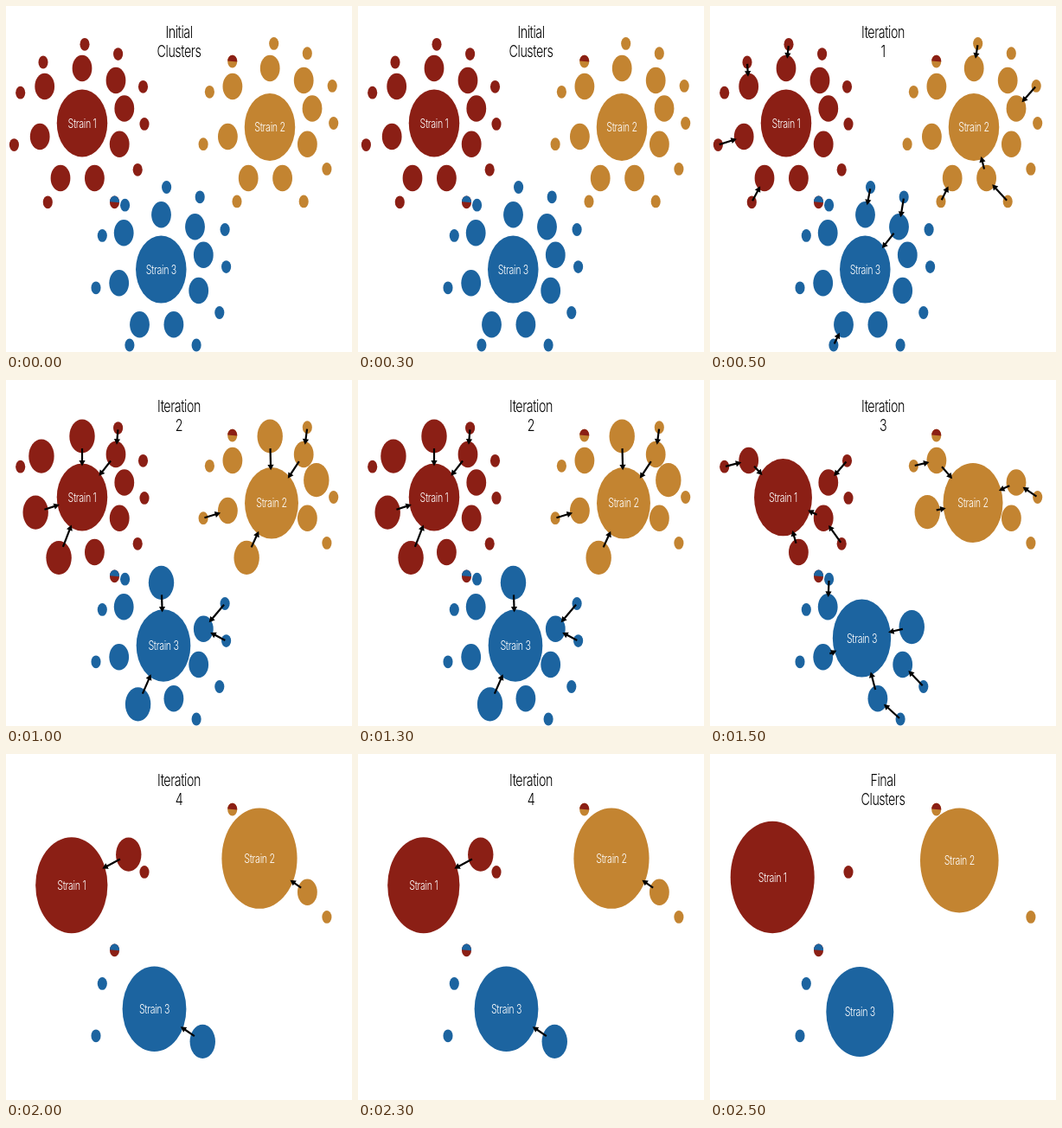
An HTML page that plays this animation: 400 px wide and 400 px high, repeating every 3 s.

```html
<!DOCTYPE html>
<html lang="en">
<head>
<meta charset="utf-8">
<title>Cluster iterations</title>
<style>
html, body { margin: 0; width: 100%; height: 100%; overflow: hidden; background: #fff; }
svg { display: block; width: 100vw; height: 100vh; }
text { font-family: Inter, "Liberation Sans", sans-serif; font-weight: 300; letter-spacing: -0.03em; text-anchor: middle; }
</style>
</head>
<body>
<svg id="stage" viewBox="0 0 400 400"></svg>
<script>
const STEP_MS = 500;
const SQUASH = 0.75; // the whole diagram lies on a narrowed plane
const RED = '#8b1f15', GOLD = '#c38431', BLUE = '#1c64a0';
const RADIUS = { s: 7.4, m: 15.2 };
const GROWN = 19.6, PUSH = 7;
const TITLES = ['Initial Clusters', 'Iteration 1', 'Iteration 2', 'Iteration 3', 'Iteration 4', 'Final Clusters'];

// Satellites of the first strain: m = inner ring, s = outer ring. Other strains shift them.
const SLOTS = {
  m: [[88, 72], [127, 86], [136.8, 118.5], [131.2, 159.7], [102.4, 199], [63, 199], [39.2, 151], [44.7, 93]],
  s: [[91, 44.3], [129.6, 55.6], [158.5, 93.3], [160, 136.4], [152.2, 189.3],
    [125.5, 226.8], [48.3, 226.8], [9.4, 160.6], [16.7, 100.2], [43, 65]]
};

// cores: x, y, radius after each round. merges: who joins whom in each round (c = core).
const STRAINS = [
  {
    color: RED, shift: { m: [0, 0], s: [0, 0] }, shared: { id: 's5', top: BLUE },
    cores: [[88, 135.5, 39], [88, 135.5, 39], [84.5, 135.7, 44.6], [75.8, 151.7, 55.5], [72.2, 142.5, 64.7]],
    merges: ['s0>m0 s9>m7 s7>m6 s6>m5', 'm0>c s1>m1 m1>c m6>c m5>c', 's8>m7 m7>c s2>m2 m3>c m4>c s4>m3', 'm2>c']
  },
  {
    color: GOLD, shift: { m: [217.2, 0], s: [218.7, -0.9] }, shared: { id: 's9', top: RED },
    cores: [[305, 140, 39], [307, 142.3, 41.3], [304, 142, 46], [293, 120.7, 58.1], [288.3, 123, 60.4]],
    merges: ['s0>m0 s2>m2 s6>m5 s5>m4 m4>c', 'm0>c s1>m1 m1>c s7>m6 m5>c', 's8>m7 m7>c m2>c s3>m2 m6>c', 'm3>c']
  },
  {
    color: BLUE, shift: { m: [91.5, 169.3], s: [94.6, 165.2] },
    cores: [[179.3, 304.6, 39], [182, 307, 41.8], [175.5, 298.5, 44.9], [171.5, 294.8, 49.2], [173.3, 298, 52]],
    merges: ['s0>m0 s1>m1 m1>c s6>m5', 'm0>c s2>m2 s3>m2 m5>c', 's9>m7 m7 m6>c m2>c m4>c s4>m3 s5>m4', 'm3>c']
  }
];

const ellipse = ({ x, y, r }, fill) =>
  `<ellipse cx="${x}" cy="${y}" rx="${r * SQUASH}" ry="${r}" fill="${fill}"/>`;

const label = (x, y, size, fill, str) =>
  `<text transform="translate(${x} ${y}) scale(${SQUASH} 1)" font-size="${size}" fill="${fill}">${str}</text>`;

const parse = (round = '') => round.split(' ').filter(Boolean).map(move => move.split('>'));

function twoTone(node, top, bottom) {
  const { x, y, r } = node, w = r * SQUASH;
  return ellipse(node, bottom) +
    `<path transform="translate(${x} ${y})" d="M${-w} -.5A${w} ${r} 0 0 1 ${w} .5z" fill="${top}"/>`;
}

// Point at a fraction of node a's radius, on the way to node b.
function towards(a, b, fraction) {
  const dx = b.x - a.x, dy = b.y - a.y;
  const t = fraction * a.r / Math.hypot(dx / SQUASH, dy);
  return [a.x + dx * t, a.y + dy * t];
}

function arrow(from, to, fromSmall, toCore) {
  const [x1, y1] = towards(from, to, fromSmall ? 0.25 : 0.72);
  const [x2, y2] = towards(to, from, toCore ? 0.92 : 0.75);
  const len = Math.hypot(x2 - x1, y2 - y1);
  const angle = Math.atan2(y2 - y1, x2 - x1) * 180 / Math.PI;
  return `<g transform="translate(${x1} ${y1}) rotate(${angle})">` +
    `<path d="M0 0H${len - 5}" stroke="#000" stroke-width="2.2"/>` +
    `<path d="M${len} 0l-6.5 -3.6v7.2z"/></g>`;
}

// A satellite that has just absorbed others is larger and pushed away from the core.
function satellite(strain, id, grown) {
  const ring = id[0];
  const [sx, sy] = SLOTS[ring][id[1]];
  const [dx, dy] = strain.shift[ring];
  const x = sx + dx, y = sy + dy;
  if (!grown) return { x, y, r: RADIUS[ring] };
  const [cx, cy] = strain.cores[0];
  const angle = Math.atan2(y - cy, x - cx);
  return { x: x + PUSH * SQUASH * Math.cos(angle), y: y + PUSH * Math.sin(angle), r: GROWN };
}

function cluster(strain, index, step) {
  const { color, shared, cores, merges } = strain;
  const gone = new Set(merges.slice(0, Math.max(0, step - 1)).flatMap(parse).map(([from]) => from));
  const grown = new Set(parse(merges[step - 2]).map(([, to]) => to));
  const [x, y, r] = cores[Math.max(0, step - 1)];
  const nodes = { c: { x, y, r } };
  for (const ring in SLOTS) {
    SLOTS[ring].forEach((_, i) => {
      const id = ring + i;
      if (!gone.has(id)) nodes[id] = satellite(strain, id, grown.has(id));
    });
  }
  const shapes = Object.entries(nodes).map(([id, node]) =>
    shared && shared.id === id ? twoTone(node, shared.top, color) : ellipse(node, color));
  const arrows = parse(merges[step - 1]).filter(([, to]) => to)
    .map(([from, to]) => arrow(nodes[from], nodes[to], from[0] === 's', to === 'c'));
  return shapes.join('') + label(x, y + 5.1, 14.2, '#fff', 'Strain ' + (index + 1)) + arrows.join('');
}

const draw = step =>
  TITLES[step].split(' ').map((word, i) => label(200, 37 + 22 * i, 19, '#000', word)).join('') +
  STRAINS.map((strain, i) => cluster(strain, i, step)).join('');

const stage = document.getElementById('stage');
let shown = -1;

function render(ms) {
  const step = Math.floor(ms / STEP_MS) % TITLES.length;
  if (step === shown) return;
  shown = step;
  stage.innerHTML = draw(step);
}

function tick() {
  render(performance.now());
  requestAnimationFrame(tick);
}
tick();
</script>
</body>
</html>
```
